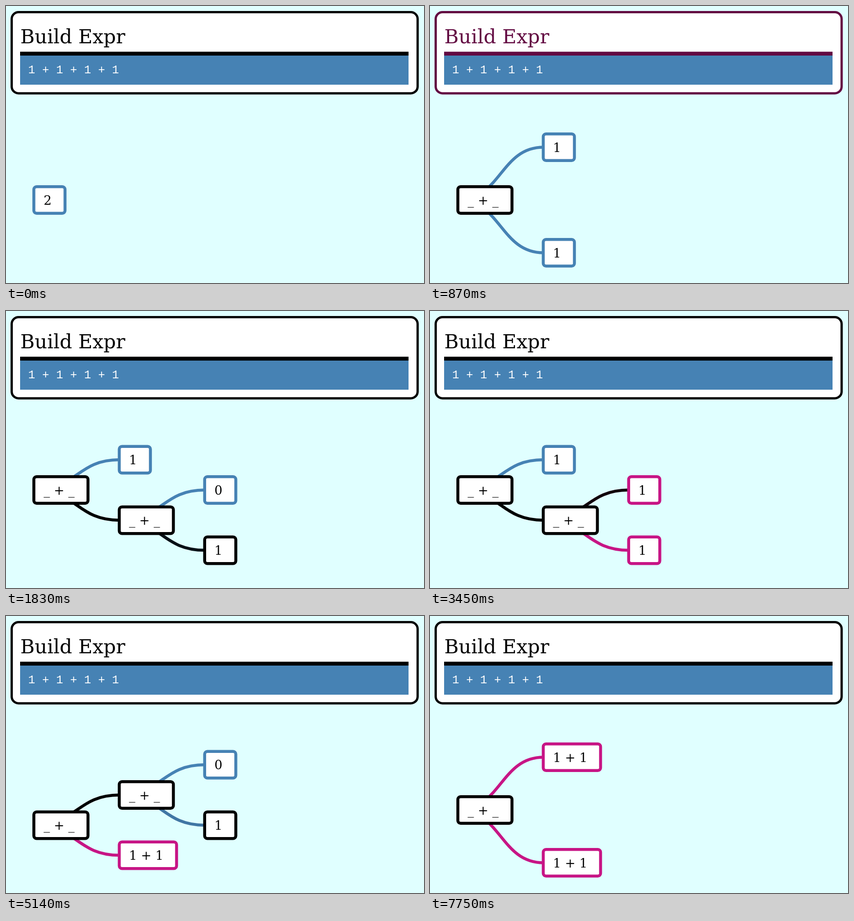
Animation, 919 px wide and 609 px high, one loop 8 s. Source, as an HTML page:

```html
<!DOCTYPE html>
<html lang="en">
<head>
<meta charset="utf-8">
<title>Build Expr</title>
<style>
  html, body { margin: 0; width: 100%; height: 100%; overflow: hidden; background: #e0ffff; }
  svg { display: block; width: 919px; height: 609px; }
  text { white-space: pre; }
  .title { font: 42.8px "DejaVu Serif", serif; }
  .code { font: 25.6px "Liberation Mono", monospace; fill: #fff; }
  .node text { font: 27.5px "DejaVu Serif", serif; }
  .node rect { fill: #fff; stroke-width: 6.5; }
  .edge { fill: none; stroke-width: 6.5; }
</style>
</head>
<body>
<svg viewBox="0 0 919 609">
  <rect id="card" x="12.5" y="13.5" width="892.5" height="178.5" rx="15" fill="#fff" stroke-width="5"/>
  <text id="title" class="title" x="31.5" y="81.5">Build Expr</text>
  <rect id="rule" x="31" y="100.5" width="854" height="9"/>
  <rect x="31" y="109" width="854" height="64" fill="#4682b4"/>
  <text class="code" x="48.8" y="148">1 + 1 + 1 + 1</text>
  <g id="edges"></g>
  <g id="nodes"></g>
</svg>
<script>
const LOOP = 8000;
const COLORS = { black: [0, 0, 0], blue: [70, 130, 180], pink: [199, 21, 133] };
const WIDTHS = { "_ + _": 125.5, "1 + 1": 132.5 };
const LEAF_WIDTH = 75;
const PLUS = "_ + _", SUM = "1 + 1";

// Vertical centres by node path: r = root, then u (upper) or l (lower).
const flat = { r: 426.5, ru: 310.5, rl: 542.5 };
const lowOpen = { r: 393.5, ru: 327, rl: 460, rlu: 393.5, rll: 526 };
const highOpen = { r: 460, ru: 393.5, rl: 526, ruu: 327, rul: 460 };

const plus = [PLUS, "black"], sum = [SUM, "pink"];
const hole = n => [n, "blue"], lit = ["1", "black"], done = ["1", "pink"];

const low = (u, l) => ({ r: plus, ru: hole("1"), rl: plus, rlu: u, rll: l });
const high = (u, l) => ({ r: plus, ru: plus, rl: sum, ruu: u, rul: l });

const STEPS = [
  [0, flat, { r: hole("2") }],
  [550, flat, { r: plus, ru: hole("1"), rl: hole("1") }],
  [1120, lowOpen, low(hole("0"), hole("0"))],
  [1680, lowOpen, low(hole("0"), lit)],
  [2240, lowOpen, low(hole("0"), done)],
  [2900, lowOpen, low(lit, done)],
  [3450, lowOpen, low(done, done)],
  [4020, flat, { r: plus, ru: hole("1"), rl: sum }],
  [4590, highOpen, high(hole("0"), hole("0"))],
  [5140, highOpen, high(hole("0"), lit)],
  [5810, highOpen, high(hole("0"), done)],
  [6380, highOpen, high(lit, done)],
  [6950, highOpen, high(done, done)],
  [7510, flat, { r: plus, ru: sum, rl: sum }]
];

const $ = id => document.getElementById(id);
const rgb = c => `rgb(${c.map(Math.round)})`;
const mix = (a, b, p) => a.map((v, i) => v + (b[i] - v) * p);
const left = id => 58 + (id.length - 1) * 187.75;

function ramp(t, from, to) {
  const p = Math.min(1, Math.max(0, (t - from) / (to - from)));
  return p * p * (3 - 2 * p);
}

function add(parent, tag, attrs, text) {
  const el = document.createElementNS("http://www.w3.org/2000/svg", tag);
  for (const k in attrs) el.setAttribute(k, attrs[k]);
  if (text) el.textContent = text;
  return parent.appendChild(el);
}

let current = -1, edges = [];

function build(index) {
  const [, rows, tree] = STEPS[index];
  const before = index ? STEPS[index - 1][2] : {};
  $("edges").replaceChildren();
  $("nodes").replaceChildren();
  edges = [];
  for (const id in tree) {
    const [label, color] = tree[id];
    const x = left(id), y = rows[id];
    const g = add($("nodes"), "g", { class: "node" });
    add(g, "rect", {
      x: x + 3.25, y: y - 29.25, rx: 6, height: 58.5,
      width: (WIDTHS[label] || LEAF_WIDTH) - 6.5, stroke: rgb(COLORS[color])
    });
    add(g, "text", { x: x + 24.8, y: y + 10 }, label);
    if (id === "r") continue;

    const parent = id.slice(0, -1);
    const x0 = left(parent) + 3.5, x1 = x + 3.5, mid = (x0 + x1) / 2;
    const d = `M${x0} ${rows[parent]}C${mid} ${rows[parent]} ${mid} ${y} ${x1} ${y}`;
    edges.push({
      el: add($("edges"), "path", { class: "edge", d }),
      from: COLORS[(before[id] || tree[id])[1]],
      to: COLORS[color]
    });
  }
}

function draw(t) {
  const index = STEPS.findLastIndex(s => s[0] <= t);
  if (index !== current) build(current = index);

  const start = STEPS[index][0] - 45;
  const p = ramp(t, start, start + 250);
  for (const e of edges) e.el.setAttribute("stroke", rgb(mix(e.from, e.to, p)));

  const glow = ramp(t, 40, 390) - ramp(t, 670, 1070);
  const tone = rgb(mix(COLORS.black, COLORS.pink, glow));
  $("card").setAttribute("stroke", tone);
  $("title").setAttribute("fill", tone);
  $("rule").setAttribute("fill", tone);
}

const origin = performance.now();
function tick() {
  draw((performance.now() - origin) % LOOP);
  requestAnimationFrame(tick);
}
tick();
</script>
</body>
</html>
```
